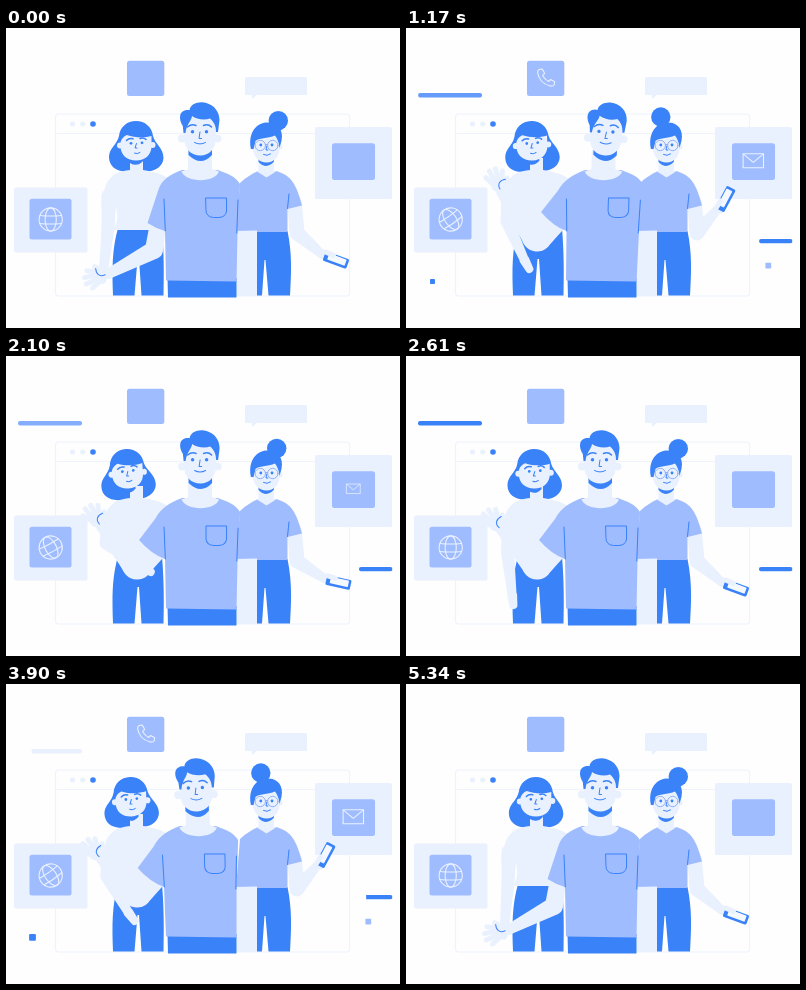
Animation, 394 px wide and 300 px high, one loop 5370 ms. Source, as an HTML page:

```html
<!DOCTYPE html>
<html lang="en">
<head>
<meta charset="utf-8">
<title>Team call</title>
<style>
  html, body { margin: 0; width: 100%; height: 100%; overflow: hidden; background: #fefefe; }
  svg { display: block; width: 100vw; height: 100vh; }
  .pale { fill: #eaf1fe; }
  .mid { fill: #9fbcff; }
  .blue { fill: #3a82f8; }
  .line { fill: none; stroke: #3a82f8; stroke-width: 1; stroke-linecap: round; stroke-linejoin: round; }
  .soft { stroke: #8fb1fb; }
  .brow { stroke-width: 1.5; }
  .frame { fill: none; stroke: #eef3fe; stroke-width: 1.2; }
  .icon { fill: none; stroke: #eaf1ff; stroke-width: 1.1; stroke-linejoin: round; }
  .fingers { fill: none; stroke: #eaf1fe; stroke-width: 5; stroke-linecap: round; }
</style>
</head>
<body>
<svg viewBox="0 0 394 300">
  <defs>
    <clipPath id="clipL"><rect x="12" y="65" width="64" height="4.4" rx="2"/></clipPath>
    <clipPath id="clipR"><rect x="353" y="211" width="33.5" height="4.2" rx="2"/></clipPath>
  </defs>

  <!-- browser window -->
  <rect class="frame" x="49.5" y="86" width="294" height="182" rx="3"/>
  <path class="frame" d="M49.5 105.5H343.5"/>
  <circle class="pale" cx="66.5" cy="96" r="2.6"/>
  <circle class="pale" cx="76.7" cy="96" r="2.6"/>
  <circle class="blue" cx="87" cy="96" r="2.8"/>

  <!-- cards -->
  <rect class="pale" x="8" y="159.5" width="73.5" height="65" rx="1.5"/>
  <rect class="mid" x="23.5" y="170.7" width="42" height="40.8" rx="2.5"/>
  <g id="globe" class="icon">
    <circle r="11.6"/>
    <ellipse rx="5.6" ry="11.6"/>
    <path d="M-11 -4Q0 -3 11 -4M-11 4Q0 5 11 4"/>
  </g>
  <rect class="mid" x="121" y="32.8" width="37.3" height="35.3" rx="2.5"/>
  <path id="call" class="icon" d="M-7 -8L-3.8 -8.5L-1.5 -4.2L-3.5 -2Q-1.5 2 2.5 4L4.5 2L8.6 4.2L8 7.5Q7 9 4 8.5Q-7 5.5 -8.5 -5Q-8.5 -7 -7 -8Z"/>
  <path class="pale" d="M240.5 49H299.5Q301 49 301 50.5V65.5Q301 67 299.5 67H251L246 71V67H240.5Q239 67 239 65.5V50.5Q239 49 240.5 49Z"/>
  <rect class="pale" x="309" y="99" width="77" height="72" rx="1.5"/>
  <rect class="mid" x="326" y="115.2" width="43" height="36.8" rx="2.5"/>
  <g id="mail" class="icon" stroke-width=".9">
    <rect x="-10.2" y="-7" width="20.4" height="14"/>
    <path d="M-10.2 -7L0 1.5L10.2 -7"/>
  </g>

  <!-- accents -->
  <g clip-path="url(#clipL)"><rect id="barL" y="64" height="7"/></g>
  <g clip-path="url(#clipR)"><rect id="barR" class="blue" y="210" height="7"/></g>
  <rect id="boxL" class="blue" x="-3.4" y="-3.4" width="6.8" height="6.8" rx="1"/>
  <rect id="boxR" class="mid" x="-2.9" y="-2.9" width="5.8" height="5.8" rx=".8"/>

  <!-- woman on the left -->
  <path class="blue" d="M112 200H156C158 225 158 245 157.5 267.5H135.5L133 231H131.5L128.5 267.5H107C106 240 106 222 112 200Z"/>
  <path id="hairW" class="blue" d="M130 93C139 93 146 99 147 108C149 116 157.5 120 157.5 130C157 138 150 143.5 140 143.5H120C110 143.5 103 138 103 129C103 120 111 117 113 108C114 99 121 93 130 93Z"/>
  <path class="pale" d="M124 130H137V142C148 144 158 146 164 152V202H107.5C112 193 112 187 110 180L95 177C99 154 103 144 124 142Z"/>
  <g id="faceW">
    <path class="blue" d="M124 128H137V133Q131 139.5 124 135Z"/>
    <circle class="pale" cx="114" cy="117.5" r="3"/>
    <circle class="pale" cx="146.5" cy="117" r="3"/>
    <path class="pale" d="M114.5 115C115 111 118 108 121 107C129 110 139 110 145.5 108V118C145.5 127 139 132.5 130 132.5C121 132.5 114.5 127 114.5 118Z"/>
    <circle class="blue" cx="125" cy="115.3" r="1.4"/>
    <circle class="blue" cx="136" cy="114.8" r="1.4"/>
    <path class="line brow" d="M120.5 112.5Q123 109.8 127 110.8M134 110.5Q137.5 109 140 111.5"/>
    <path class="line" d="M130.5 115.5L129 120H131M128.5 125.2Q131.5 126.5 134 124.5"/>
  </g>
  <path id="armW" class="pale"/>

  <!-- woman on the right -->
  <path class="blue" d="M250 203H281.5C286 225 285.500 243 284 267.5H262.5L259.5 232H258.5L256 267.5H250Z"/>
  <path id="armP" class="pale"/>
  <path class="mid" d="M252 143H270C284 147 290 154 296 177.5L281.5 181L281.5 204H230L234 155C240 149 246 146 252 143Z"/>
  <path class="line" d="M283 166L281.5 180.5"/>
  <path class="pale" d="M252.5 130H268V142.5L270 143.5L260.5 149.5L251 143.5L252.5 142.5Z"/>
  <circle id="bun" class="blue" r="9.7"/>
  <circle class="pale" cx="246.5" cy="119" r="2.6"/>
  <circle class="pale" cx="274" cy="119" r="2.6"/>
  <path class="blue" d="M252.5 130H268V133.5Q260.5 142 252.5 134Z"/>
  <path class="pale" d="M247 104H273.5V121C273 129 268 134.5 260.5 134.5C253 134.5 247.5 129 247 121Z"/>
  <path class="blue" d="M245 121C242 108 248 95.5 260 94.5C271 93.5 278 101 275.5 113L273.5 120C273 114 271 110 269 107.5C262 110.500 252 110 249.5 113L247.5 121Z"/>
  <g class="line soft">
    <circle cx="254.3" cy="117.5" r="5.2"/>
    <circle cx="266.8" cy="117.5" r="5.2"/>
    <path d="M259.5 116.5H261.6"/>
  </g>
  <circle class="blue" cx="254.8" cy="117" r="1.4"/>
  <circle class="blue" cx="266" cy="117" r="1.4"/>
  <path class="line" d="M260.8 118L260 122H262M257.5 126.5Q261 128.5 264.5 126"/>
  <g id="phone">
    <circle class="pale" cx="-11" cy="-1" r="5.5"/>
    <rect class="blue" x="-12.5" y="-5" width="25" height="10" rx="1.5"/>
    <rect x="-8.5" y="-4" width="18.5" height="6.600" rx=".8" fill="#f4f8ff"/>
    <path class="fingers" stroke-width="4" d="M-12 -4L-4 -3.5"/>
  </g>

  <!-- man in the middle -->
  <path class="pale" d="M229 203L251 202.5V268H229Z"/>
  <path id="armM" class="pale"/>
  <g id="handM">
    <circle class="pale" cy="-8" r="7.5"/>
    <path class="fingers" d="M-4 -8L-9.5 -18.5M-2 -10L-4 -23.5M2 -10L2.5 -23.5M4 -9L8.5 -19.5M3 -4L10.5 -11"/>
    <path class="line" d="M0 -3C-1 -9 3 -11.5 8.5 -10.5"/>
  </g>
  <path class="blue" d="M161.5 250H230.5V269.5H162Z"/>
  <g id="lean">
    <path id="shirt" class="mid"/>
    <path class="line" d="M158 171L159.3 203M232 172L230.8 205M200 170H220.5V183Q220 189 213 189.5H207.5Q200.5 189 200 183Z"/>
    <path class="pale" d="M182 122H206V141L213 143.5C209 155 180 155 175.5 143.5L182 141Z"/>
    <g id="headM">
      <path class="blue" d="M182.5 120H206V127Q195 139 182.5 127Z"/>
      <circle class="pale" cx="176" cy="110.5" r="4"/>
      <circle class="pale" cx="211.5" cy="110.5" r="4"/>
      <path class="pale" d="M178 90Q194 80 210 90V111C209.5 121 203 127.5 194.3 127.5C185 127.5 178.5 121 178 111Z"/>
      <path class="blue" d="M177.5 105L176.800 98C173 92 173 85 177.500 83C180 81.500 182 81.800 183.500 82.300C184 77 190 74 196 74.300C206 75 213.300 82 213.500 92L212 104H210C210 98 208 94 204 90.500C198 92.500 190 91 186 88C185.500 93 180.500 96 179.500 105Z"/>
      <path class="line brow" d="M181.5 99Q185.5 95.5 190 97.5M197.5 97.5Q202 95.5 205.5 99"/>
      <g id="eyes">
        <circle class="blue" cx="186.5" r="1.7"/>
        <circle class="blue" cx="200.5" r="1.7"/>
      </g>
      <path id="lids" class="line soft" d="M183.5 103.5Q186.5 106 189.5 104M197.5 104Q200.5 106 203.5 103.5"/>
      <path class="line" d="M194 104L193 110.5H195.5M188.5 114.5Q194 117.5 199.5 114.5"/>
    </g>
  </g>
</svg>

<script>
const LOOP = 5370, HALF = LOOP / 2;
const BLUE = [58, 130, 248], MID = [159, 188, 255], PALE = [234, 241, 254];
const $ = id => document.getElementById(id);
const set = (id, name, value) => $(id).setAttribute(name, value);
const mix = (a, b, k) => a + (b - a) * k;
const blend = (a, b, k) => `rgb(${a.map((v, i) => mix(v, b[i], k))})`;

// Eased 0 to 1 between two times, and a rise followed by a fall.
function ramp(t, from, to) {
  const s = Math.min(1, Math.max(0, (t - from) / (to - from)));
  return s * s * (3 - 2 * s);
}
const pulse = (t, a, b, c, d) => ramp(t, a, b) - ramp(t, c, d);

// Tapered capsule between two joints.
function limb(x1, y1, w1, x2, y2, w2) {
  const a = Math.atan2(y2 - y1, x2 - x1), r = w1 / 2, q = w2 / 2;
  const nx = -Math.sin(a), ny = Math.cos(a);
  return `M${x1 + nx * r} ${y1 + ny * r}A${r} ${r} 0 0 1 ${x1 - nx * r} ${y1 - ny * r}`
    + `L${x2 - nx * q} ${y2 - ny * q}A${q} ${q} 0 0 1 ${x2 + nx * q} ${y2 + ny * q}Z`;
}

const scaleAt = (id, x, y, s) => set(id, 'transform', `translate(${x} ${y}) scale(${s})`);

function bar(id, x, width, head, tail) {
  set(id, 'x', x + width * (1 - head));
  set(id, 'width', width * Math.max(0, head - tail));
}

function accents(t, u) {
  set('globe', 'transform', `translate(44.7 191.5) rotate(${-35 * pulse(u, 0, 600, 1900, 2600)})`);
  scaleAt('call', 140.1, 49.5, pulse(u, 60, 480, 1350, 2100));
  scaleAt('mail', 347.3, 132.8, pulse(u, 150, 560, 1950, 2350));

  // Bars enter from the right and leave to the left, twice per loop.
  const second = t > 3540;
  const head = second ? ramp(t, 3550, 4050) : ramp(t, 300, 1200);
  const tail = second ? ramp(t, 4100, 5100) : ramp(t, 2750, 3530);
  bar('barL', 12, 64, head, tail);
  bar('barR', 353, 33.5, head, tail);
  set('barL', 'fill', second ? blend(PALE, PALE, 0) : blend(BLUE, MID, pulse(t, 900, 1500, 1900, 2500)));

  scaleAt('boxL', 26.5, 253.4, pulse(t, 250, 700, 1000, 1500) + pulse(t, 2700, 3200, 4300, 5250));
  scaleAt('boxR', 362.3, 237.6, pulse(t, 250, 700, 1350, 1980) + pulse(t, 2700, 3200, 4650, 5250));
}

function leftWoman(u) {
  const bend = pulse(u, 850, 1500, 2450, 2675);
  const tilt = `translate(${-8 * bend} 0) rotate(${-4 * bend} 130 125)`;
  set('hairW', 'transform', tilt);
  set('faceW', 'transform', tilt);
  const ex = mix(102, 100, bend), ey = mix(200, 187, bend);
  const a = mix(96, 34, bend) * Math.PI / 180, dx = Math.cos(a), dy = Math.sin(a);
  const wx = ex + dx * 42, wy = ey + dy * 42;
  set('armW', 'd', limb(103, 168, 15, ex, ey, 13) + limb(ex, ey, 13, wx, wy, 9)
    + limb(wx, wy, 10, wx + dx * 12, wy + dy * 10, 8));
}

function rightWoman(u) {
  const lift = pulse(u, 322, 790, 1580, 2220);
  const x = 330 + 31 * lift - 41.5 * lift * lift, y = mix(232, 171, lift);
  const deg = mix(20, -62, lift), a = deg * Math.PI / 180;
  set('phone', 'transform', `translate(${x} ${y}) rotate(${deg})`);
  set('armP', 'd', limb(288.5, 174, 14.5, 291, 205, 15)
    + limb(291, 205, 15, x - Math.cos(a) * 12 - 2, y - Math.sin(a) * 12 - 1, 8.5));
  set('bun', 'cx', mix(272.3, 254.8, lift));
  set('bun', 'cy', mix(92.7, 89, lift));
}

function man(t) {
  const up = pulse(t, 100, 780, 3950, 4720), drift = ramp(t, 800, 3000);
  const wx = mix(102, 95, up) - 14 * Math.sin(Math.PI * up);
  const wy = mix(246, 163 + 12 * drift, up);
  const ex = mix(148, 131, up), ey = mix(222, 208, up), ew = mix(18, 31, up);
  set('armM', 'd', limb(153, 190, mix(16, 22, up), ex, ey, ew) + limb(ex, ey, ew, wx, wy, 10));
  set('handM', 'transform', `translate(${wx} ${wy}) rotate(${mix(-105, -18 - 22 * drift, up)})`);

  const sway = pulse(t, 150, 780, 800, 2200) - pulse(t, 2620, 3300, 3350, 4500);
  const k = -3.7 * sway / 103;
  set('lean', 'transform', `matrix(1 0 ${k} 1 ${-253 * k} 0)`);
  set('headM', 'transform', `rotate(${3 * sway} 194 150)`);
  const sx = mix(141.5, 133, up), sy = mix(195, 184, up);
  set('shirt', 'd', `M176 142C163 147 156 151 ${mix(152, 149, up)} 163L${sx} ${sy}`
    + `Q${mix(149, 145, up)} ${mix(200, 198, up)} 159 203L160 252.5L230.5 253.5L231.5 205L234 156`
    + `C229 148 222 146 212 142Z`);

  const blink = c => pulse(t, c - 110, c - 40, c + 40, c + 110);
  const shut = blink(1590) + blink(4560);
  scaleAt('eyes', 0, 103.7, `1 ${1 - shut}`);
  set('lids', 'opacity', shut);
}

const start = performance.now();
function draw() {
  const t = (performance.now() - start) % LOOP, u = t % HALF;
  accents(t, u);
  leftWoman(u);
  rightWoman(u);
  man(t);
  requestAnimationFrame(draw);
}
draw();
</script>
</body>
</html>
```
